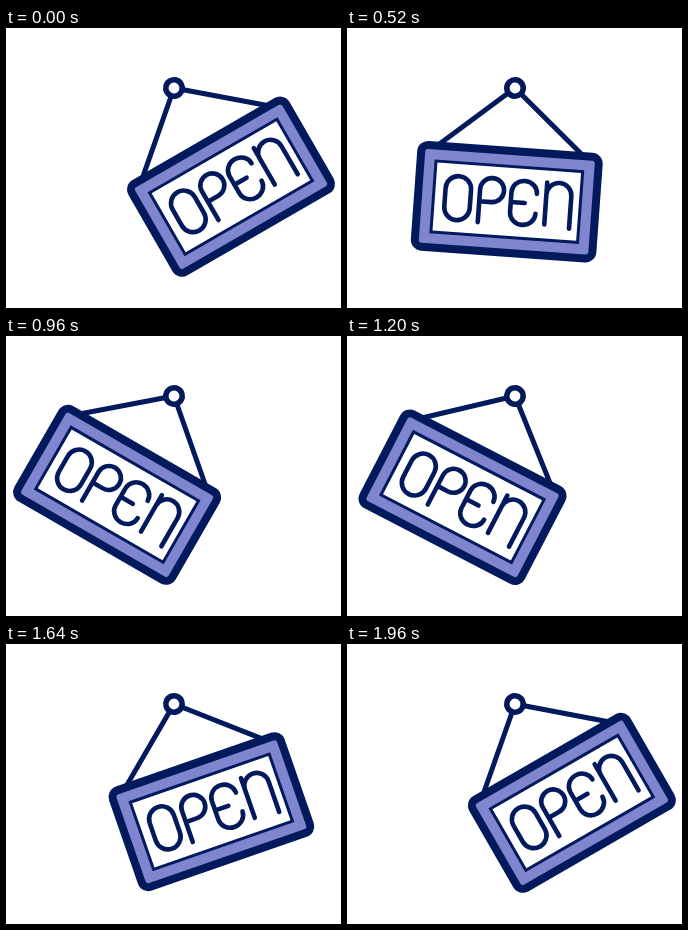
These frames come from a looping animation (335 by 280 pixels, 2 s). An HTML page:

```html
<!DOCTYPE html>
<html lang="en">
<head>
<meta charset="utf-8">
<title>Swinging open sign</title>
<style>
  html, body { margin: 0; width: 100%; height: 100%; overflow: hidden; background: #fff; }
  svg { display: block; width: 100vw; height: 100vh; }
</style>
</head>
<body>
<svg viewBox="0 0 335 280" role="img" aria-label="Open">
  <!-- origin: the nail the sign hangs from -->
  <g id="sign" fill="none" stroke="#02195c" stroke-linecap="round" stroke-linejoin="round">
    <path d="M-71 61 0 0 71 61" stroke-width="5"/>
    <circle r="8.2" fill="#fff" stroke-width="5.6"/>
    <g transform="translate(0 114)">
      <rect x="-89" y="-51" width="178" height="102" rx="7" fill="#7f86cf" stroke-width="8"/>
      <rect x="-73.5" y="-35.5" width="147" height="71" fill="#fff" stroke-width="3" stroke-linejoin="miter"/>
      <g stroke-width="4.6">
        <rect x="-62" y="-22" width="25.5" height="44" rx="12.75"/>
        <path d="M-27.5 22.5V-10.5a12 12 0 1 1 12 12H-27.5"/>
        <path d="M29.5 -10a12.75 12 0 0 0-25.5 0V10a12.75 12 0 0 0 25.5 0M4 0H18"/>
        <path d="M39 -22V20M39 -10a12.5 12.5 0 0 1 25 0V22.5"/>
      </g>
    </g>
  </g>
</svg>
<script>
  const sign = document.getElementById("sign");
  const swing = 30, half = 1000;

  const bezier = (a, b, s) => 3 * a * s * (1 - s) ** 2 + 3 * b * s * s * (1 - s) + s ** 3;

  // cubic-bezier(.64, 0, .35, 1), solved by bisection
  function ease(x) {
    let lo = 0, hi = 1;
    for (let i = 0; i < 24; i++) {
      const mid = (lo + hi) / 2;
      if (bezier(0.64, 0.35, mid) < x) lo = mid; else hi = mid;
    }
    return bezier(0, 1, lo);
  }

  function draw(now) {
    const t = now % (2 * half) / half;
    const side = t < 1 ? -1 : 1;
    const angle = side * swing * (1 - 2 * ease(t % 1));
    sign.setAttribute("transform", `translate(168 60) rotate(${angle})`);
    requestAnimationFrame(draw);
  }
  draw(performance.now());
</script>
</body>
</html>
```
